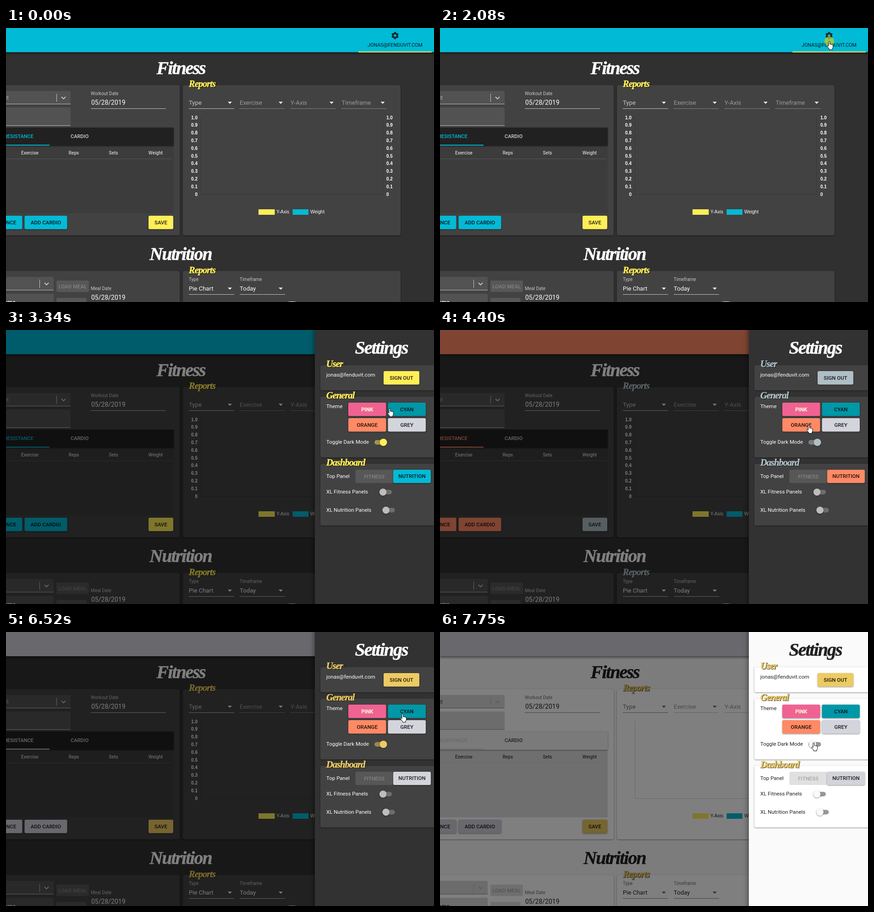
Recreate the animation shown at these times as an HTML page. Size 934 by 600 pixels, loop 8000 ms.

```html
<!DOCTYPE html>
<html lang="en">
<head>
<meta charset="utf-8">
<title>Theme settings</title>
<style>
html, body { margin: 0; width: 100%; height: 100%; overflow: hidden; background: #303030; }
svg { display: block; width: 934px; height: 600px; }
text { font-family: Roboto, sans-serif; white-space: pre; }
.script { font-family: "Liberation Serif", serif; font-weight: 700; font-style: italic; stroke-width: .5px; }
.title { font-size: 40px; letter-spacing: -2px; fill: var(--text); stroke: var(--text); text-anchor: middle; }
.sub { font-size: 20.5px; letter-spacing: -1px; fill: var(--second); stroke: var(--second); filter: drop-shadow(1px 1px .5px rgba(0,0,0,.75)); }
.chart { font-family: "Liberation Sans", sans-serif; font-size: 10px; }
.btn { font-size: 11.5px; font-weight: 500; text-anchor: middle; }
.raised { filter: drop-shadow(0 1px 1.5px rgba(0,0,0,.45)); }
</style>
</head>
<body>
<svg id="stage" viewBox="0 0 934 600" xmlns="http://www.w3.org/2000/svg"></svg>
<script>
const LOOP = 8000;
const stage = document.getElementById('stage');
const INK = 'rgba(0,0,0,.87)';

// ---- drawing helpers ----
const v = name => `var(--${name})`;
const rect = (x, y, x2, y2, fill, extra = '') =>
  `<rect x="${x}" y="${y}" width="${x2 - x}" height="${y2 - y}" style="fill:${fill}" ${extra}/>`;
const text = (x, y, str, size, fill = v('text'), extra = '') =>
  `<text x="${x}" y="${y}" font-size="${size}" style="fill:${fill}" ${extra}>${str}</text>`;
const line = (x, y, x2, y2, color = v('under'), extra = '') =>
  `<path d="M${x} ${y}L${x2} ${y2}" style="stroke:${color}" fill="none" ${extra}/>`;
const card = (x, y, x2, y2) => rect(x, y, x2, y2, v('card'), 'rx="4" class="raised"');
const title = (x, y, str) => `<text class="script title" x="${x}" y="${y}">${str}</text>`;
const sub = (x, y, str) => `<text class="script sub" x="${x}" y="${y}">${str}</text>`;
const button = (x, y, x2, y2, label, fill, color = INK, extra = '') =>
  rect(x, y, x2, y2, fill, 'rx="3" class="raised"') +
  `<text class="btn" x="${(x + x2) / 2}" y="${(y + y2) / 2 + 3.8}" style="fill:${color}" ${extra}>${label}</text>`;
const disabled = (x, y, x2, y2, label) =>
  rect(x, y, x2, y2, v('off'), 'rx="3"') +
  `<text class="btn" x="${(x + x2) / 2}" y="${(y + y2) / 2 + 4}" style="fill:${v('offText')}">${label}</text>`;
const chevron = (x, y) =>
  `<path d="M${x - 4.5} ${y - 2.5}l4.5 4.5 4.5-4.5" fill="none" stroke-width="1.8" style="stroke:${v('sep')}"/>`;
const combo = (x2, y, y2, sep) =>
  rect(-40, y, x2, y2, v('field'), 'rx="2"') + line(-40, y2, x2, y2) +
  line(sep + .5, y + 6, sep + .5, y2 - 5, v('sep')) + chevron(sep + 15.5, (y + y2) / 2 + 1);
const select = (x, y, value, color, dotted) =>
  text(x, y, value, 13.1, color) +
  `<path d="M${x + 85} ${y - 6.5}h9l-4.5 4.5z" style="fill:${v('caret')}"/>` +
  line(x, y + 8.5, x + 99, y + 8.5, v('under'), dotted ? 'stroke-dasharray="1.5 1.5"' : '');
const dateField = (y, label) =>
  text(185, y, label, 10, v('label')) + text(186, y + 21, '05/28/2019', 14) + line(185, y + 30, 349, y + 30);
const toggleOff = (x, y) =>
  rect(x, y - 5, x + 27, y + 5, v('track'), 'rx="5"') +
  `<circle class="raised" cx="${x + 7.7}" cy="${y}" r="7.8" style="fill:${v('thumb')}"/>`;

// ---- page ----
function ticks() {
  let out = '';
  for (let i = 0; i <= 10; i++) {
    const y = 199.5 + i * 16.8, n = i === 10 ? '0' : ((10 - i) / 10).toFixed(1);
    out += `<text class="chart" font-weight="700" fill="#fff" x="418" y="${y}" text-anchor="end">${n}</text>` +
           `<text class="chart" font-weight="700" fill="#fff" x="830" y="${y}">${n}</text>`;
  }
  return out;
}

const header =
  rect(0, 0, 934, 53, v('prime'), 'filter="url(#bar)"') +
  `<g fill="none" stroke="#16282d">
    <circle cx="849" cy="16.5" r="4.6" stroke-width="3.6"/>
    <circle cx="849" cy="16.5" r="6.7" stroke-width="2.6" pathLength="12" stroke-dasharray="1 1" stroke-dashoffset="1.5"/>
  </g>` +
  text(849, 41, 'JONAS@FENDUVIT.COM', 10.8, INK, 'text-anchor="middle"') +
  rect(769, 51.5, 929, 53.5, v('second'));

const workout =
  card(-40, 125, 379, 454) +
  combo(141, 138, 166.5, 110) + text(6, 157, 'Load Workout', 13, v('place'), 'text-anchor="end"') +
  rect(-40, 174, 141, 214, v('field'), 'rx="2"') + line(-40, 213.7, 141, 213.7) +
  dateField(146.5, 'Workout Date') +
  rect(-40, 258, 366, 406, v('table')) +
  rect(-40, 218, 366, 258, v('tabs'), 'rx="2" class="raised"') +
  text(60, 241, 'RESISTANCE', 11, v('prime'), 'text-anchor="end" font-weight="500"') +
  text(141, 241, 'CARDIO', 11, v('soft'), 'font-weight="500"') +
  rect(-40, 255.5, 95, 257.5, v('prime')) +
  [[52, 'Exercise'], [148, 'Reps'], [234.5, 'Sets'], [326.5, 'Weight']].map(([x, s]) =>
    text(x, 277, s, 10.1, v('soft'), 'text-anchor="middle" font-weight="500"')).join('') +
  line(-40, 286.5, 362, 286.5, v('rule')) +
  button(-85, 411, 35.5, 440.5, '', v('prime')) +
  text(22.5, 429.6, 'ADD RESISTANCE', 11.5, INK, 'text-anchor="end" font-weight="500"') +
  button(40.5, 411, 133.5, 440.5, 'ADD CARDIO', v('prime')) +
  button(311, 411, 365, 440.5, 'SAVE', v('second'));

const reports =
  card(386, 125, 861, 454) + sub(399, 129, 'Reports') +
  select(399, 168, 'Type', v('label')) + select(510, 168, 'Exercise', v('hint'), 1) +
  select(621, 168, 'Y-Axis', v('hint'), 1) + select(732.5, 168, 'Timeframe', v('hint'), 1) +
  ticks() +
  '<path d="M425.5 196V364.5H821.5V196" fill="none" stroke="#000" stroke-opacity=".16"/>' +
  rect(551, 397, 586.5, 409, '#ffee58') + rect(625.5, 397, 660, 409, '#02bad6') +
  `<text class="chart" x="590" y="405.5" style="fill:${v('text')}">Y-Axis</text>` +
  `<text class="chart" x="664" y="405.5" style="fill:${v('text')}">Weight</text>`;

const nutrition =
  card(-40, 532, 379, 640) + combo(104, 545, 574, 73) +
  rect(-40, 582, 104, 620, v('field'), 'rx="2"') +
  text(21, 605, 'Meal Name', 13, v('text'), 'text-anchor="end" font-weight="500"') +
  disabled(110, 553, 181, 578, 'LOAD MEAL') + disabled(110, 591, 175.5, 616, 'ADD MEAL') +
  dateField(573.8, 'Meal Date') +
  card(386, 532, 861, 640) + sub(399, 536.5, 'Reports') +
  text(399, 554, 'Type', 10, v('label')) + text(510, 554, 'Timeframe', 10, v('label')) +
  select(399, 575, 'Pie Chart') + select(510, 575, 'Today') +
  '<circle cx="624" cy="656.5" r="57.5" fill="#fff"/>';

const drawer =
  rect(674, -20, 1000, 620, v('page'), 'filter="url(#side)"') + title(819, 52, 'Settings') +
  card(686, 77, 1000, 132) + card(686, 146, 1000, 279) + card(686, 293, 1000, 428) +
  sub(699, 81, 'User') + sub(699, 150, 'General') + sub(699, 297, 'Dashboard') +
  text(699, 101.5, 'jonas@fenduvit.com', 11.7) +
  button(824, 90, 902, 119.5, 'SIGN OUT', v('second')) +
  text(699, 171, 'Theme', 11.5) +
  button(747, 159, 829.5, 188.5, 'PINK', '#f06292', '#fff6d8', 'stroke="#fff6d8" stroke-width=".4"') +
  button(833.5, 159, 916, 188.5, 'CYAN', '#0097a7') +
  button(747, 193, 829.5, 222.5, 'ORANGE', '#ff8a65') +
  button(833.5, 193, 916, 222.5, 'GREY', '#d3d4dc') +
  text(699, 249, 'Toggle Dark Mode', 11.5) +
  rect(804, 241, 831.5, 251, v('modeTrack'), 'rx="5"') +
  `<circle id="mode" class="raised" cy="246" r="8" style="fill:${v('modeThumb')}"/>` +
  text(699, 323.5, 'Top Panel', 11.5) +
  disabled(762.5, 306, 845, 335, 'FITNESS') + button(845, 306, 927, 335, 'NUTRITION', v('prime')) +
  text(699, 358, 'XL Fitness Panels', 11.5) + toggleOff(815, 355) +
  text(699, 397.5, 'XL Nutrition Panels', 11.5) + toggleOff(821.5, 394.5);

const cursor =
  `<circle id="press" r="10.5" fill="#f2d400" fill-opacity=".6"/>
  <g id="cursor" fill="#fff" stroke="#000" stroke-linejoin="round">
    <path id="hand" d="M-1.5 11V1.8a1.5 1.5 0 0 1 3 0v5q1.2-.8 2.4.3 1.4-.6 2.3.5 2-.3 2 1.7v4l-1.5 3v2.2H0v-1.5L-4.3 11.6Q-5.3 10-4 9.5q1.1-.3 2.5 1.5Z"/>
    <path id="arrow" d="M0 0v16l3.7-3.5 2.4 5.6 2.5-1.1-2.4-5.4h5.2Z"/>
  </g>`;

stage.innerHTML =
  `<defs>
    <filter id="bar" x="-5%" y="-20%" width="110%" height="150%"><feDropShadow dx="0" dy="2.5" stdDeviation="2.5" flood-opacity=".5"/></filter>
    <filter id="side" x="-20%" width="140%"><feDropShadow dx="-1" dy="0" stdDeviation="6" flood-opacity=".5"/></filter>
  </defs>` +
  rect(0, 0, 934, 600, v('page')) + header +
  title(381.5, 101, 'Fitness') + workout + reports +
  title(381, 508, 'Nutrition') + nutrition +
  '<rect id="shade" width="934" height="600"/>' +
  `<g id="drawer">${drawer}</g>` + cursor;

// ---- timing ----
const $ = id => document.getElementById(id);
const parts = Object.fromEntries(['shade', 'drawer', 'mode', 'press', 'cursor', 'hand', 'arrow'].map(id => [id, $(id)]));
const progress = (t, a, b) => Math.min(1, Math.max(0, (t - a) / (b - a)));
const smooth = p => p * p * (3 - 2 * p);
const easeOut = p => 1 - (1 - p) ** 3;
const rgb = hex => [1, 3, 5].map(i => parseInt(hex.slice(i, i + 2), 16));
const mix = (a, b, p) => {
  const A = rgb(a), B = rgb(b);
  return `rgb(${A.map((c, i) => Math.round(c + (B[i] - c) * p))})`;
};

// theme: main, accent, track of a switch that is on
const CYAN = ['#02bad6', '#ffee58', '#a0944a'];
const ORANGE = ['#ff8a65', '#b0bec5', '#797f81'];
const GREY = ['#d3d4db', '#edcb63', '#98874f'];
// dark and light value of each surface
const FADE = {
  page: ['#303030', '#fafafa'], card: ['#424242', '#ffffff'], field: ['#525252', '#dadada'],
  tabs: ['#212121', '#f5f5f5'], table: ['#3c3c3c', '#e0e0e0'], under: ['#c4c4c4', '#868686'],
  label: ['#c8c8c8', '#707070'], hint: ['#9c9c9c', '#949494'], off: ['#575757', '#e0e0e0'],
  track: ['#6e6e6e', '#989898'], sep: ['#c8c8c8', '#b8b8b8']
};
const SNAP = {
  text: ['#ffffff', '#212121'], soft: ['#d0d0d0', '#404040'], rule: ['#565656', '#d6d6d6'],
  place: ['#a8a8a8', '#404040'], caret: ['#ffffff', '#606060'],
  offText: ['#838383', '#a6a6a6'], thumb: ['#bdbdbd', '#fafafa']
};

// pointer tip: time, x, y
const PATH = [
  [0, 864, 606], [160, 864, 606], [950, 872, 192], [1700, 849.5, 30], [1800, 849.5, 29],
  [2950, 849.5, 29], [3150, 884, 104], [3340, 837.5, 171], [3530, 808, 229], [3710, 805, 208],
  [4800, 805, 208], [5100, 867.5, 207], [6240, 867.5, 207], [6520, 865.5, 179],
  [7040, 815.5, 242], [LOOP, 815.5, 242]
];
const PRESS = [2080, 3810, 5150, 7080];
const HOT = [[824, 90, 902, 120], [747, 159, 829, 189], [833, 159, 916, 189],
  [747, 193, 829, 223], [833, 193, 916, 223], [804, 236, 832, 256]];

function slope(i, k) {
  const a = PATH[i - 1], b = PATH[i], c = PATH[i + 1];
  if (!a || !c || (b[k] - a[k]) * (c[k] - b[k]) <= 0) return 0;
  return (c[k] - a[k]) / (c[0] - a[0]);
}
function pointer(t) {
  let i = 0;
  while (i < PATH.length - 2 && PATH[i + 1][0] <= t) i++;
  const a = PATH[i], b = PATH[i + 1], d = b[0] - a[0], p = (t - a[0]) / d;
  return [1, 2].map(k => a[k] + (b[k] - a[k]) * smooth(p) +
    d * p * (1 - p) * ((1 - p) * slope(i, k) - p * slope(i + 1, k)));
}

function draw(t) {
  const set = (name, value) => stage.style.setProperty('--' + name, value);
  const late = t >= 5380;
  const from = late ? ORANGE : CYAN, to = late ? GREY : ORANGE;
  const swap = smooth(late ? progress(t, 5380, 5620) : progress(t, 4150, 4400));
  const [main, accent, track] = from.map((c, i) => mix(c, to[i], swap));
  set('prime', main);
  set('second', accent);

  const light = smooth(progress(t, 7475, 7740)), flipped = t >= 7470;
  for (const k in FADE) set(k, mix(...FADE[k], light));
  for (const k in SNAP) set(k, SNAP[k][+flipped]);
  set('modeThumb', flipped ? '#fafafa' : accent);
  set('modeTrack', flipped ? mix(GREY[2], FADE.track[1], light) : track);
  parts.mode.setAttribute('cx', 823.5 - 10.5 * smooth(progress(t, 7485, 7640)));

  const open = easeOut(progress(t, 2230, 2480));
  parts.shade.setAttribute('opacity', open / 2);
  parts.drawer.setAttribute('transform', `translate(${285 * (1 - open)} 0)`);

  const [x, y] = pointer(t);
  const hand = t < 2950 ? y < 53 : HOT.some(([l, top, r, b]) => x >= l && x <= r && y >= top && y <= b);
  parts.cursor.setAttribute('transform', `translate(${x} ${y})`);
  parts.hand.setAttribute('visibility', hand ? 'visible' : 'hidden');
  parts.arrow.setAttribute('visibility', hand ? 'hidden' : 'visible');
  parts.press.setAttribute('cx', x);
  parts.press.setAttribute('cy', y);
  parts.press.setAttribute('visibility', PRESS.some(s => t >= s && t < s + 150) ? 'visible' : 'hidden');
}

const start = performance.now();
function tick() {
  draw((performance.now() - start) % LOOP);
  requestAnimationFrame(tick);
}
tick();
</script>
</body>
</html>
```
